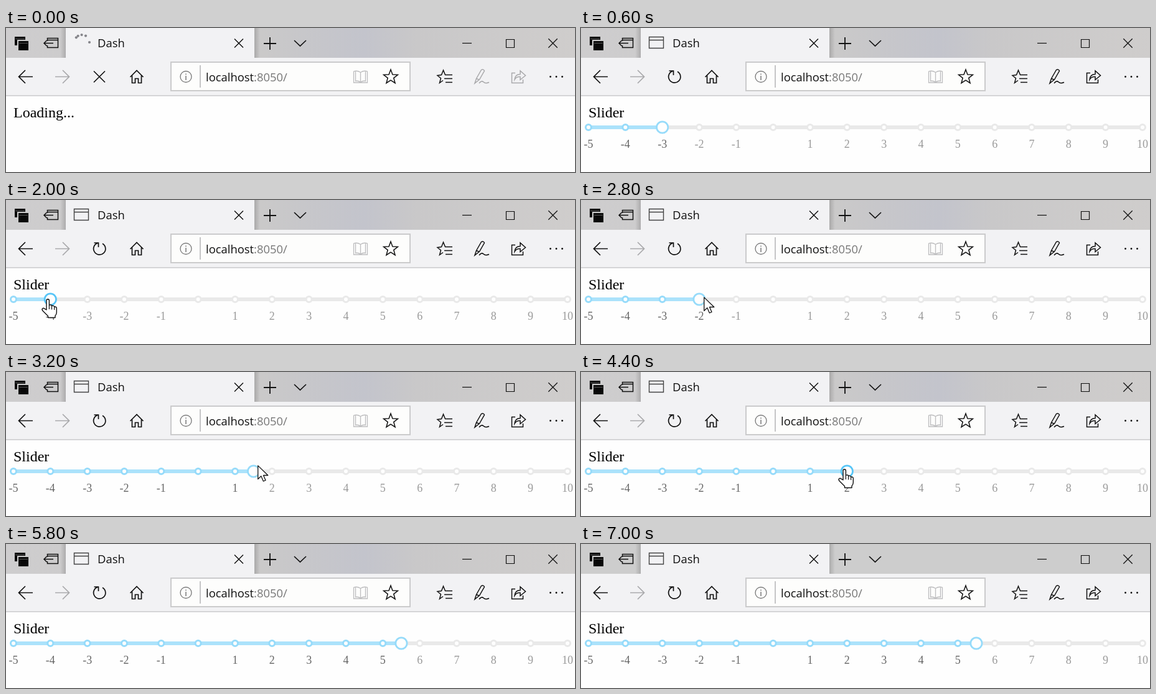
These frames come from a looping animation (914 by 232 pixels, 7.2 s). An HTML page with a canvas:

```html
<!DOCTYPE html>
<html lang="en">
<head>
<meta charset="utf-8">
<title>Slider</title>
<style>
html, body { margin: 0; width: 100%; height: 100%; overflow: hidden; background: #fefefe; }
canvas { display: block; }
</style>
</head>
<body>
<canvas id="stage" width="914" height="232"></canvas>
<script>
const ctx = document.getElementById('stage').getContext('2d');
const LOOP = 7200;
const SANS = '18.4px "Open Sans", "Noto Sans", sans-serif';
const SERIF = '"Liberation Serif", "Times New Roman", serif';
const INK = '#111', FADED = '#a9a9ab';

// Each entry: start time, value
const values = [[0, -3], [1400, -4], [2800, -2], [3000, 0.5], [3200, 1.5], [3400, 2], [4800, 4], [5000, 5.5]];
// Each entry: start time, cursor kind, left, top
const cursors = [
  [0, ''], [1200, 'arrow', 103, 199], [1400, 'hand', 69, 166], [1600, 'hand', 57, 164],
  [1800, 'hand', 64, 170], [2000, 'hand', 57, 159], [2400, 'hand', 65, 162],
  [2800, 'arrow', 197, 156], [3000, 'arrow', 345, 147], [3200, 'arrow', 404, 150],
  [3400, 'hand', 416, 166], [3600, 'hand', 414, 161], [4200, 'hand', 415, 161],
  [4400, 'hand', 413, 156], [4800, 'arrow', 552, 166], [5000, 'arrow', 635, 169],
  [5200, 'arrow', 634, 168], [5800, '']
];
const at = (track, t) => track.filter(k => k[0] <= t).pop();

function rect(x, y, w, h, fill) {
  ctx.fillStyle = fill;
  ctx.fillRect(x, y, w, h);
}

function path(d, color = INK, width = 1.6, fill) {
  const p = new Path2D(d);
  if (fill) { ctx.fillStyle = fill; ctx.fill(p); }
  ctx.strokeStyle = color;
  ctx.lineWidth = width;
  ctx.stroke(p);
}

function disc(x, y, r, fill, stroke, width) {
  ctx.beginPath();
  ctx.arc(x, y, r, 0, Math.PI * 2);
  if (fill) { ctx.fillStyle = fill; ctx.fill(); }
  if (stroke) { ctx.strokeStyle = stroke; ctx.lineWidth = width; ctx.stroke(); }
}

function text(s, x, y, font, color, align = 'left') {
  ctx.font = font;
  ctx.fillStyle = color;
  ctx.textAlign = align;
  ctx.fillText(s, x, y);
}

function star(x, y, r) {
  let d = '';
  for (let i = 0; i < 10; i++) {
    const a = -Math.PI / 2 + i * Math.PI / 5, q = i % 2 ? r * 0.42 : r;
    d += (i ? 'L' : 'M') + (x + q * Math.cos(a)) + ' ' + (y + q * Math.sin(a));
  }
  path(d + 'Z', INK, 1.5);
}

const cross = (x, y, r, w) => path(`M${x - r} ${y - r}l${2 * r} ${2 * r}m0 ${-2 * r}l${-2 * r} ${2 * r}`, INK, w);

function titleBar(t) {
  const g = ctx.createLinearGradient(0, 0, 914, 0);
  const tint = t < 6800 ? 1 : t < 7000 ? 0.5 : 0;
  const shade = (r, gr, b) => `rgb(${[r, gr, b].map(c => Math.round(205 + (c - 205) * tint))})`;
  g.addColorStop(0, shade(206, 205, 206));
  g.addColorStop(0.45, shade(202, 201, 201));
  g.addColorStop(0.63, shade(195, 196, 204));
  g.addColorStop(0.72, shade(201, 200, 201));
  g.addColorStop(1, shade(207, 205, 204));
  rect(0, 0, 914, 48, g);

  for (const [x, dir] of [[96, -1], [399, 1]]) {
    const s = ctx.createLinearGradient(x, 0, x + dir * 9, 0);
    s.addColorStop(0, 'rgba(0,0,0,.16)');
    s.addColorStop(1, 'rgba(0,0,0,0)');
    rect(Math.min(x, x + dir * 9), 0, 9, 48, s);
  }
  rect(96, 0, 303, 49, '#f2f2f4');

  rect(14, 14, 17, 14, '#080808');
  rect(18, 19, 19, 18, '#cdcdcd');
  rect(20, 21, 16, 15, '#080808');
  rect(15, 17, 15, 1, '#555');
  rect(21, 24, 14, 1, '#555');
  path('M66.5 21V16.5H83.5V31.5H66.5V28M67 19.5H83M61 24.5H76M65.5 20L61 24.5L65.5 29', INK, 1.5);

  cross(374, 24.5, 7, 1.5);
  path('M424 15V35M414 25H434', INK, 1.8);
  path('M463 20L472.5 29L482 20', INK, 1.7);
  path('M733 24.5H748', INK, 1.2);
  path('M803.5 18.5H816.5V31.5H803.5Z', INK, 1.2);
  cross(878.5, 24.5, 7.2, 1.3);
}

function tab(t) {
  if (t < 400) {
    const turn = t < 200 ? 0 : 1.2;
    [200, 220, 238, 268, 300, 360].forEach((deg, i) => {
      if (!i) return;
      const a = deg * Math.PI / 180 + turn;
      disc(122 + 12 * Math.cos(a), 23 + 12 * Math.sin(a), 2.1, '#85858a');
    });
  } else {
    path('M109.5 14.5H132.5V32.5H109.5ZM110 19.5H132', '#444', 1.4);
  }
  text('Dash', 147, 31, SANS, '#111');
}

function toolbar(t) {
  const ready = t >= 400;
  rect(0, 48, 914, 61, '#f2f2f4');
  rect(96, 46, 303, 4, '#f2f2f4');
  rect(0, 108, 914, 2, '#d5d5d7');

  path('M43 78.5H20M31 68L20.5 78.5L31 89', INK, 1.7);
  path('M79 78.5H102M91 68L101.5 78.5L91 89', FADED, 1.7);
  if (ready) path('M148 69.2A9.6 9.6 0 1 0 155 70.2M141.5 69H148.5V76', INK, 1.7);
  else cross(150, 78.5, 9, 1.7);
  path('M199.5 79L210 68.5L220.5 79M202.5 76.5V88.5H207.5V81.5H212.5V88.5H217.5V76.5', INK, 1.7);

  rect(264, 54, 386, 48, '#cbcbcc');
  rect(266, 56, 382, 44, '#fdfdfc');
  disc(289, 78.5, 9, null, '#777', 1.3);
  path('M289 77V84M289 73.5V75.3', '#777', 1.5);
  rect(311, 60, 2, 36, '#c5c5c6');
  text('localhost', 321, 86, SANS, '#111');
  text(':8050/', 321 + ctx.measureText('localhost').width, 86, SANS, '#777');
  path('M569.5 71.5Q564 68 558.5 70V88H580.5V70Q575 68 569.5 71.5V88M561.5 70V85.5Q566 84.5 569.5 87.5Q573 84.5 577.5 85.5V70', '#bdbdbf', 1.3);

  star(618, 79, 12);
  path('M705.5 75.5L702.5 68L699.5 75.5L693 76.5L698.5 81L696.5 88.5L702 84.5', INK, 1.5);
  path('M705 75.5H717M704 81.5H717M706 87.5H717', INK, 1.6);

  const tool = ready ? INK : FADED;
  path('M753 89L755.5 81.5L763.5 67.5Q766.5 65.5 768.5 69L760.5 83L753 89ZM755.5 81.5L760.5 83.5M760 89Q764 84 767 87T776 87.5', tool, 1.5);
  path('M818 72.5H812.5V88.5H830.5V83M817 83Q818 74.5 826 74.5V69L834.5 76.5L826 83.5V78.5Q820 78 817 83Z', tool, 1.5);
  for (const x of [874.5, 884, 893.5]) disc(x, 78.5, 1.4, INK);
}

const toX = v => 12 + (v + 5) * 59.33;

function slider(value, hover) {
  const x = toX(value);
  text('Slider', 12, 144, '24px ' + SERIF, '#000');
  ctx.lineCap = 'round';
  path('M12 160H902', '#e9e9e9', 6);
  path(`M12 160H${x}`, '#abe2fb', 6);
  ctx.lineCap = 'butt';
  for (let v = -5; v <= 10; v++) {
    const on = v <= value;
    disc(toX(v), 160, 4.5, '#fefefe', on ? '#96dbfa' : '#e9e9e9', 3);
    if (v) text(v, toX(v), 193, '18px ' + SERIF, on ? '#666' : '#999', 'center');
  }
  disc(x, 160, 9.2, '#fefefe', hover ? '#57c5f7' : '#96dbfa', 2.8);
}

function cursor(kind, x, y) {
  ctx.save();
  ctx.translate(x, y);
  ctx.lineJoin = 'round';
  if (kind === 'arrow') {
    path('M.7 .9V22.5L5.8 17.8L9.4 26L13 24.4L9.5 16.5H16.8Z', '#111', 1.3, '#fff');
  } else {
    path('M8 18V3Q8 .8 10.2 .8T12.4 3V11Q13 9.5 15 10T16.5 12Q17.5 10.7 19.2 11.4T20.6 13.5Q22 12.4 23.3 13.4T24.3 16V22Q24.3 25 22 27.5V30.5H10.5V28L2 19.5Q.2 17 1.7 15.8T5 16.2Z', '#111', 1.4, '#fff');
    path('M12.4 11V17M16.5 12V17.5M20.6 13.5V18', '#111', 1.2);
  }
  ctx.restore();
}

function draw(t) {
  rect(0, 0, 914, 232, '#fefefe');
  titleBar(t);
  toolbar(t);
  tab(t);
  if (t < 200) {
    text('Loading...', 12, 144, '24px ' + SERIF, '#000');
    return;
  }
  const [, kind, x, y] = at(cursors, t);
  slider(at(values, t)[1], kind === 'hand');
  if (kind) cursor(kind, x, y);
}

const start = performance.now();
function tick() {
  draw((performance.now() - start) % LOOP);
  requestAnimationFrame(tick);
}
tick();
</script>
</body>
</html>
```
